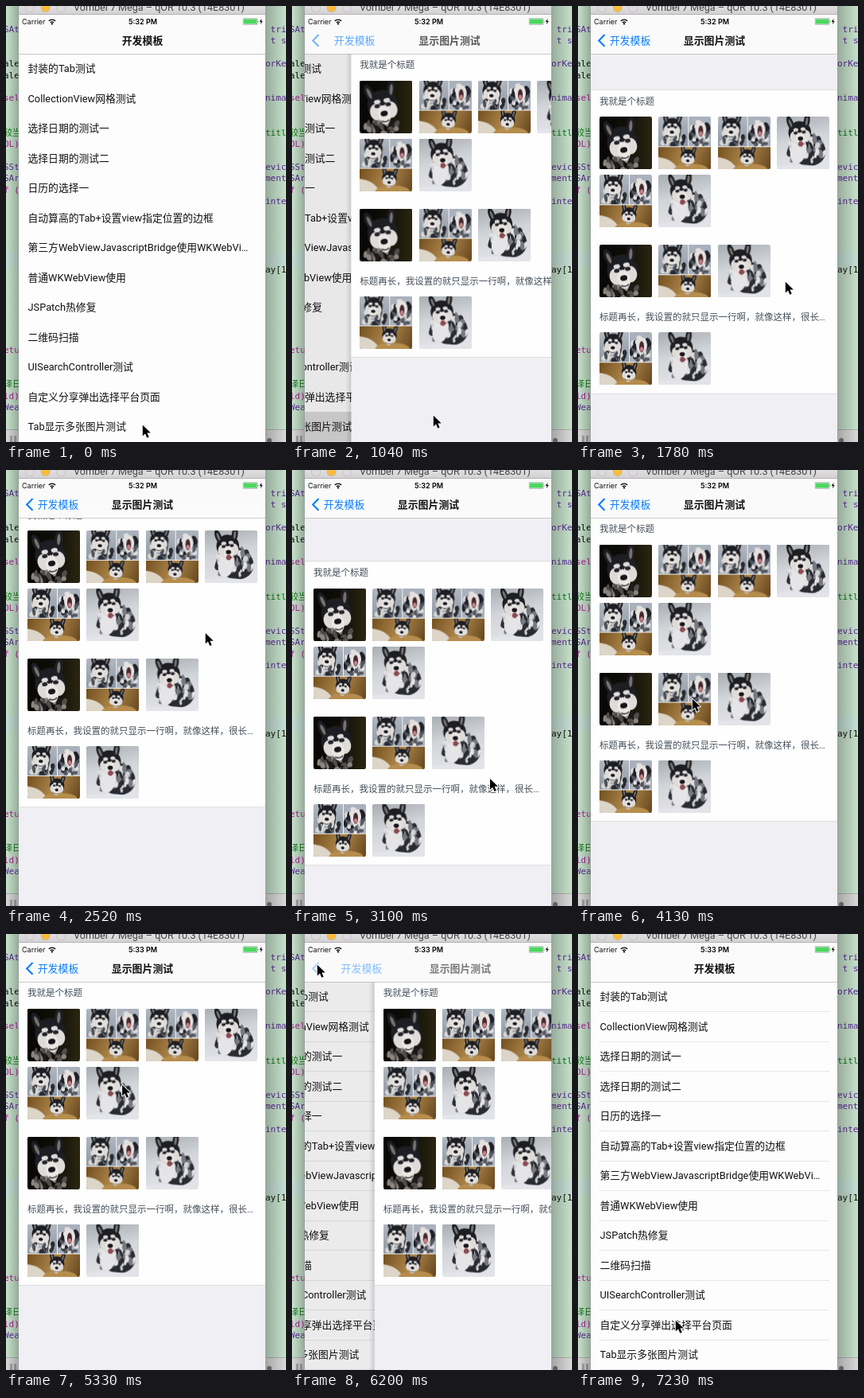
These frames come from a looping animation (352x548 px, 8000 ms). An HTML page with a canvas:

```html
<!DOCTYPE html>
<html lang="zh-CN">
<head>
<meta charset="utf-8">
<style>
html, body { margin: 0; width: 100%; height: 100%; overflow: hidden; background: #c6e1cb; }
canvas { display: block; width: 352px; height: 548px; }
</style>
</head>
<body>
<canvas id="stage"></canvas>
<script>
const W = 352, H = 548, LOOP = 8000;
const LEFT = 16, RIGHT = 326, WIDTH = RIGHT - LEFT, TOP = 11, NAV = 60, PHOTO = 66;
const FONT = 'Roboto, "Noto Sans CJK SC", "Noto Sans CJK", sans-serif';
const UI = 'Inter, sans-serif';
const MONO = '"DejaVu Sans Mono", "Noto Sans CJK SC", monospace';
const BLUE = '#087eff', INK = '#111';
const STEP = 147.27, START = 750;

const stage = document.getElementById('stage');
const dpr = window.devicePixelRatio || 1;
stage.width = W * dpr;
stage.height = H * dpr;
let ctx = stage.getContext('2d');

const rows = ['封装的Tab测试', 'CollectionView网格测试', '选择日期的测试一', '选择日期的测试二',
  '日历的选择一', '自动算高的Tab+设置view指定位置的边框', '第三方WebViewJavascriptBridge使用WKWebVi…',
  '普通WKWebView使用', 'JSPatch热修复', '二维码扫描', 'UISearchController测试',
  '自定义分享弹出选择平台页面', 'Tab显示多张图片测试'];

// Visible ends of the code lines on both sides of the phone.
const codeLeft = 'SAt|||ale|ale||sel|||较当|OL)||SSt|SAr|f (||||||||||||||etu|||译日|ld)|Wea';
const codeRight = ' tri| t s||orKe|||nima|||titl|||evic|ment||inte||||||ay[1';

// Turning points of the movements: step, then position.
const scrollPath = [[5.5, -47], [10, 31], [13.8, -76], [17.9, 19], [23, -47]];
const cursorPath = [[2, 171, 526], [8, 260, 346], [10, 258, 400], [13.8, 249, 181], [18, 248, 419],
  [24, 143, 287], [25, 124, 284], [26, 124, 284], [28, 218, 285], [29, 218, 285],
  [36, 31, 38], [39, 31, 38], [45, 122, 485]];

const clamp = u => Math.max(0, Math.min(1, u));
const swing = u => (1 - Math.cos(Math.PI * clamp(u))) / 2;

function along(path, s) {
  const next = Math.max(1, path.findIndex(point => point[0] >= s));
  const end = s >= path.at(-1)[0] ? path.length - 1 : next;
  const a = path[end - 1], b = path[end];
  const u = swing((s - a[0]) / (b[0] - a[0]));
  return a.slice(1).map((v, i) => v + (b[i + 1] - v) * u);
}

function seeded(seed) {
  return () => (seed = seed * 16807 % 2147483647) / 2147483647;
}

function rect(color, x, y, w, h) {
  ctx.fillStyle = color;
  ctx.fillRect(x, y, w, h);
}

function oval(color, x, y, rx, ry = rx, turn = 0) {
  ctx.fillStyle = color;
  ctx.beginPath();
  ctx.ellipse(x, y, rx, ry, turn, 0, 7);
  ctx.fill();
}

function gradient(colors, x0, y0, x1, y1) {
  const g = ctx.createLinearGradient(x0, y0, x1, y1);
  colors.forEach((color, i) => g.addColorStop(i / (colors.length - 1), color));
  return g;
}

function fade(x0, x1, dark) {
  const g = gradient(['rgba(0,0,0,0)', `rgba(0,0,0,${dark})`], x0, 0, x1, 0);
  rect(g, Math.min(x0, x1), 0, Math.abs(x1 - x0), H);
}

function path(d, color, line) {
  ctx.strokeStyle = ctx.fillStyle = color;
  ctx.lineWidth = line || 0;
  ctx[line ? 'stroke' : 'fill'](new Path2D(d));
}

function text(str, x, y, font, color = INK, align = 'left', alpha = 1) {
  ctx.globalAlpha = clamp(alpha);
  ctx.font = font;
  ctx.fillStyle = color;
  ctx.textAlign = align;
  ctx.fillText(str, x, y);
  ctx.globalAlpha = 1;
}

function clipped(x, y, w, h, draw) {
  ctx.save();
  ctx.beginPath();
  ctx.rect(x, y, w, h);
  ctx.clip();
  draw();
  ctx.restore();
}

function dog(x, y, size, turn = 0) {
  ctx.save();
  ctx.translate(x, y);
  ctx.rotate(turn);
  ctx.scale(size, size);
  oval('#1d1e23', 0, -1, 11, 11);
  for (const side of [-1, 1]) {
    oval('#1d1e23', side * 8, -11, 3, 7, side * .25);
    oval('#77716f', side * 8, -11, 1.2, 4, side * .25);
    oval('#dedbd8', side * 5, 3, 5, 6);
    oval('#dedbd8', side * 3.5, -4, 2.4, 1.6);
    oval('#24242a', side * 4, -1, 2, 1.4);
  }
  oval('#e9e6e3', 0, 6, 4.5, 7);
  oval('#15151a', 0, 5, 2.6, 2);
  path('M-3,10 Q0,12 3,10', '#4a4648', 1);
  ctx.restore();
}

// Short strokes spread over an oval.
function fur(seed, x, y, rx, ry, colors, count) {
  const rnd = seeded(seed);
  for (let i = 0; i < count; i++) {
    const a = rnd() * 2 * Math.PI, r = Math.sqrt(rnd());
    oval(colors[i % colors.length], x + rx * r * Math.cos(a), y + ry * r * Math.sin(a),
      1.5 + 2 * rnd(), 2 + 4 * rnd(), rnd() - .5);
  }
}

function darkPhoto() {
  rect(gradient(['#080705', '#100e08', '#2b2611'], 0, 0, 66, 0), 0, 0, 66, 66);
  fur(5, 28, 58, 22, 12, ['#1c1b1c', '#514d4a', '#8b8580'], 45);
  dog(29, 33, 1.75, -.18);
}

function collagePhoto() {
  rect(gradient(['#b2b8c0', '#8f99a5'], 0, 0, 0, 37), 0, 0, 37, 37);
  fur(11, 20, 29, 16, 9, ['#282b32', '#d9d6d3', '#4b4f56'], 34);
  dog(17, 14, 1.05, .05);
  clipped(38, 0, 28, 37, () => {
    rect('#a9b1bc', 38, 0, 28, 37);
    fur(17, 52, 22, 12, 16, ['#202127', '#e3dfdd', '#54575f'], 42);
    oval('#e5e1df', 53, 16, 7, 10);
    oval('#47272c', 53, 18, 3, 7);
    oval('#ca8287', 53, 21, 2, 3);
  });
  clipped(0, 38, 66, 28, () => {
    rect(gradient(['#73501f', '#ad854a', '#66471e'], 0, 38, 66, 66), 0, 38, 66, 28);
    oval('#dcd5c8', 5, 64, 20, 12, .35);
    oval('#b68d4d', 41, 67, 22, 8);
    dog(37, 51, .85, .08);
  });
  rect('#f4f3f2', 0, 37, 66, 1);
  rect('#f4f3f2', 37, 0, 1, 37);
}

function snowPhoto() {
  rect(gradient(['#a9aeb3', '#d2d5d9', '#e2e3e8'], 0, 0, 14, 66), 0, 0, 66, 66);
  oval('#292b31', 38, 41, 24, 20, .4);
  fur(23, 38, 42, 23, 19, ['#e3e2e5', '#2a2c32', '#777a80', '#d2d2d6'], 70);
  oval('#e5e4e6', 27, 43, 10, 16, .2);
  dog(29, 21, 1.3, -.12);
  oval('#8e4850', 30, 34, 3, 3.5);
  oval('#e4e5ea', 25, 65, 30, 5);
}

function photo(paint) {
  const sheet = document.createElement('canvas');
  sheet.width = sheet.height = PHOTO * dpr;
  const main = ctx;
  ctx = sheet.getContext('2d');
  ctx.scale(dpr, dpr);
  ctx.beginPath();
  ctx.roundRect(0, 0, PHOTO, PHOTO, 2);
  ctx.clip();
  paint();
  ctx = main;
  return sheet;
}

const photos = { d: photo(darkPhoto), c: photo(collagePhoto), s: photo(snowPhoto) };

function photoRow(kinds, y) {
  [...kinds].forEach((kind, i) => ctx.drawImage(photos[kind], 27 + i * 74.3, y, PHOTO, PHOTO));
}

function codeColor(word) {
  if (/[一-龥]|titl/.test(word)) return '#0b7a12';
  if (/ale|ay/.test(word)) return INK;
  return /sel|etu|\)|f /.test(word) ? '#b01a9a' : '#5c2a99';
}

function codeColumn(lines, x) {
  lines.split('|').forEach((word, i) =>
    text(word, x, 33 + 14.4 * i, '11px ' + MONO, codeColor(word)));
}

function drawDesktop() {
  rect('#c6e1cb', 0, 0, W, H);
  rect('#c5dfd6', 0, 310, W, 17);
  codeColumn(codeLeft, -3);
  codeColumn(codeRight, 326);
  rect('#d9d9d9', 0, 532, W, 16);
  rect('#adb3ae', 0, 532, W, 1);
  for (const x of [5, 10]) rect('#a5a5a5', x, 540, 3, 8);
  oval('#777', 331, 546, 3);
  fade(0, LEFT, .24);
  fade(W, RIGHT, .24);
}

function drawTitleBar() {
  rect(gradient(['#e0dee0', '#d2d0d2'], 0, 0, 0, TOP), LEFT, 0, WIDTH, TOP);
  ['#dcdadc', '#f8bd3d', '#dcdadc'].forEach((color, i) => {
    oval('#bdb9b6', 30 + i * 19.7, 2, 6);
    oval(color, 30 + i * 19.7, 2, 5.4);
  });
  text('Vombel 7 Mega – qOR 10.3 (14E8301)', 85, 6, '12.6px ' + FONT, '#454545');
  rect('#b5b3b5', LEFT, TOP - 1, WIDTH, 1);
}

function drawList(shift, tapped, lines) {
  rect('#fdfdfd', LEFT, TOP, WIDTH, H - TOP);
  if (tapped) rect('#d9d9d9', LEFT, 510, WIDTH, 37.5);
  rows.forEach((row, i) => {
    const y = 79 + 37.5 * i;
    text(row, 27.5 + shift, y + 4.4, '12.8px ' + FONT);
    if (lines) rect('#e6e6e8', 27 + shift, Math.round(y + 18), 289, 1);
  });
}

function drawPage(scroll) {
  rect('#efeff4', LEFT, TOP, WIDTH, H - TOP);
  ctx.translate(0, scroll);
  rect('#dddde1', LEFT, 106, WIDTH, 383);
  rect('#fefefe', LEFT, 107, WIDTH, 381);
  const label = '11.5px ' + FONT;
  text('我就是个标题', 27, 125.3, label, '#454f59');
  photoRow('dccs', 140.5);
  photoRow('cs', 213.5);
  photoRow('dcs', 301.5);
  text('标题再长，我设置的就只显示一行啊，就像这样，很长…', 27, 396.5, label, '#454f59');
  photoRow('cs', 411.5);
}

function drawStatus(clock) {
  text('Carrier', 20, 23, '9px ' + UI);
  for (const r of [3, 6]) {
    path(`M${58 - r * .7},${23 - r * .7} A${r},${r} 0 0 1 ${58 + r * .7},${23 - r * .7}`, '#000', 1.4);
  }
  oval('#000', 58, 22.4, 1.1);
  text(clock, 172, 23, '600 9px ' + UI, '#000', 'center');
  path('M298.3,15.8 h17.4 v7.4 h-17.4 Z M316.8,18 v3', '#8b968c', .7);
  rect('#4cd75f', 299, 16.5, 16, 6);
  path('M321.5,15.5 l-2.8,4.5 h1.9 l-.8,3.5 l3,-4.7 h-1.9 Z', INK);
}

function drawNav(p, clock) {
  rect('rgba(251,251,251,.965)', LEFT, TOP, WIDTH, NAV - TOP);
  rect('#bdbdc0', LEFT, NAV, WIDTH, .8);
  const plain = '12.9px ' + FONT, bold = 'bold ' + plain, y = 47.8;
  const backX = 65.5 + 106 * Math.pow(p, 1.25);
  text('开发模板', backX, y, plain, BLUE, 'center', 1 - 1.8 * p);
  text('开发模板', backX, y, bold, INK, 'center', (p - .4) / .6);
  text('显示图片测试', 171.5 + 141 * p, y, bold, INK, 'center', 1 - 1.6 * p);
  ctx.globalAlpha = clamp(1 - 2.4 * p);
  path('M33.5,36 l-7.3,7.4 l7.3,7.4', BLUE, 2.1);
  ctx.globalAlpha = 1;
  drawStatus(clock);
}

function drawCursor(x, y) {
  ctx.save();
  ctx.translate(x, y);
  const arrow = 'M.8,.8 v13.7 l3.2,-3 l2.3,5.3 l2.4,-1 l-2.3,-5.2 h4.4 Z';
  ctx.lineJoin = 'round';
  path(arrow, '#fff', 1.8);
  path(arrow, '#000');
  ctx.restore();
}

function draw(time) {
  const s = time < START ? 0 : Math.min(45, 1 + Math.floor((time - START + 9) / STEP));
  const leaving = s > 37;
  const turn = swing((s - (leaving ? 37 : 1)) / 2.8);
  const p = leaving ? turn : 1 - turn;
  const slide = p * WIDTH;

  ctx.setTransform(dpr, 0, 0, dpr, 0, 0);
  drawDesktop();
  clipped(LEFT, TOP, WIDTH, H - TOP, () => {
    if (p > 0) {
      drawList(-.3 * (WIDTH - slide), s > 0 && !leaving, leaving);
      rect(`rgba(0,0,0,${.1 * (1 - p)})`, LEFT, TOP, WIDTH, H - TOP);
    }
    if (p < 1) {
      if (p > 0) fade(LEFT + slide - 7, LEFT + slide, .13);
      clipped(LEFT + slide, TOP, WIDTH, H, () => {
        ctx.translate(slide, 0);
        drawPage(along(scrollPath, s)[0]);
      });
    }
    drawNav(p, s < 27 ? '5:32 PM' : '5:33 PM');
  });
  drawTitleBar();
  for (const x of [LEFT - .6, RIGHT]) rect('#8d9b91', x, 0, .6, H);
  drawCursor(...along(cursorPath, s));
}

function tick() {
  draw(performance.now() % LOOP);
  requestAnimationFrame(tick);
}
tick();
</script>
</body>
</html>
```
